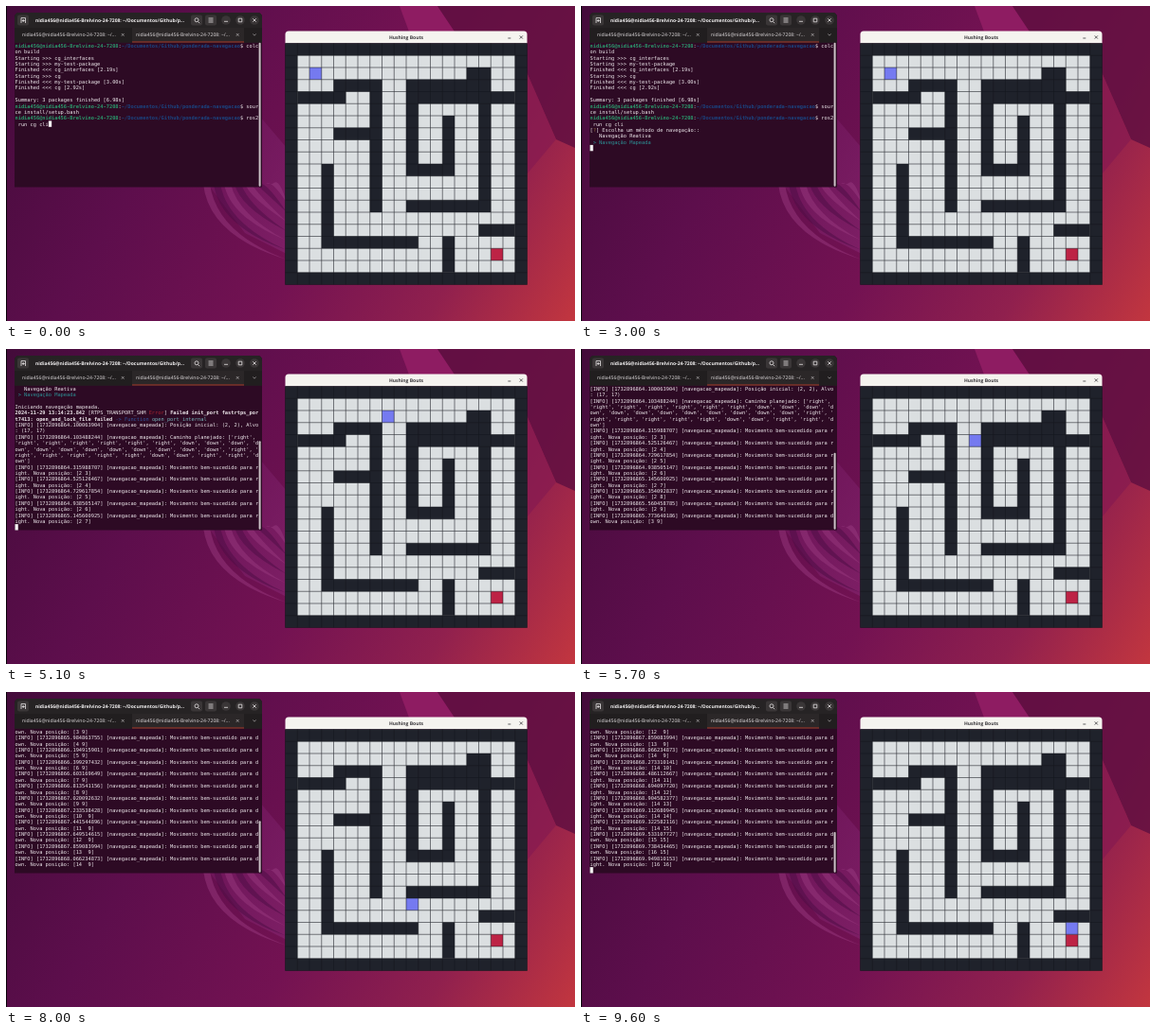
Write an HTML page that moves like this. It is 600 px wide and 333 px high and loops after 9700 ms.

```html
<!DOCTYPE html>
<html lang="pt">
<head>
<meta charset="utf-8">
<title>Navegação</title>
<style>
  html, body { margin: 0; width: 100%; height: 100%; overflow: hidden; background: #4d0d42; }
  svg { display: block; width: 600px; height: 333px; }
  text { white-space: pre; text-rendering: geometricPrecision; }
  .ui { font: 5px "Open Sans", "Noto Sans", sans-serif; fill: #e6e2e4; }
  .tab { font-size: 5.1px; }
  .bold { font-weight: 700; fill: #f4f2f3; }
  .icon { fill: none; stroke: #e6e3e4; stroke-width: .8; }
  #rows { font: 5.34px "DejaVu Sans Mono", monospace; fill: #eee8ec; }
  .user { fill: #2a9a6c; font-weight: 700; }
  .path { fill: #1b4480; font-weight: 700; }
  .strong { font-weight: 700; }
  .err { fill: #a8232f; }
  .ask { fill: #8d6c3c; }
  .pick { fill: #2c9195; }
  .fn { fill: #31559a; }
  .call { fill: #74b4b8; }
</style>
</head>
<body>
<svg viewBox="0 0 600 333">
  <defs>
    <linearGradient id="sky" gradientUnits="userSpaceOnUse" x1="0" y1="0" x2="600" y2="333">
      <stop offset="0" stop-color="#430b3a"/>
      <stop offset=".3" stop-color="#5d0e4c"/>
      <stop offset=".58" stop-color="#731252"/>
      <stop offset=".8" stop-color="#90204e"/>
      <stop offset="1" stop-color="#c2363f"/>
    </linearGradient>
    <linearGradient id="glow" x1="0" y1="0" x2="1" y2="1">
      <stop offset="0" stop-color="#6d1459"/>
      <stop offset="1" stop-color="#82246d"/>
    </linearGradient>
  </defs>

  <g id="wallpaper">
    <path d="M0 0H600V333H0Z" fill="url(#sky)"/>
    <path d="M415 0H455L473 27H425Z" fill="#8e1c62"/>
    <path d="M455 0H600V150L580 141L549 70V27H473Z" fill="#5e0e40" opacity=".8"/>
    <path d="M549 70L580 141L549 178Z" fill="#861a50" opacity=".7"/>
    <path d="M262 110L296 150V262L252 240L215 191Z" fill="url(#glow)" opacity=".7"/>
    <g id="ribbons"/>
    <path d="M0 0H1V333H0Z" fill="#0a0209"/>
  </g>

  <g id="terminal">
    <path d="M9 191.5V12Q9 7 14 7H265Q270 7 270 12V191.5Z" fill="#2d0a24"/>
    <path d="M9 38.5V12Q9 7 14 7H265Q270 7 270 12V38.5Z" fill="#262324"/>
    <path d="M9 23H270V38.5H9Z" fill="#211e1f"/>
    <path d="M133 23H251V38.5H133Z" fill="#2b2728"/>
    <path d="M133 37.5H251V38.4H133Z" fill="#a8372b"/>
    <g fill="#3a3637">
      <rect x="12" y="9.5" width="12" height="11" rx="2"/>
      <rect x="195" y="9.5" width="12" height="11" rx="2"/>
      <rect x="210" y="9.5" width="12" height="11" rx="2"/>
      <circle cx="232" cy="15" r="4.8"/><circle cx="247" cy="15" r="4.8"/><circle cx="262" cy="15" r="4.8"/>
    </g>
    <path class="icon" d="M16 18V12.6H20.5V18M18.2 14V17M16.7 15.5H19.8M202.6 16.6L204.2 18.2M213.5 13H218.5M213.5 15H218.5M213.5 17H218.5M230 16.3H234M245.2 13.2H248.8V16.8H245.2ZM260.3 13.3L263.7 16.7M263.7 13.3L260.3 16.7"/>
    <circle class="icon" cx="201" cy="14.8" r="2"/>
    <path class="icon" opacity=".65" d="M121.8 29L124.6 31.8M124.6 29L121.8 31.8M242.8 29L245.6 31.8M245.6 29L242.8 31.8M260.3 29.6L262 31.2L263.7 29.6"/>
    <text class="ui bold" id="title" x="31" y="16.8"/>
    <text class="ui tab" x="17" y="32.2"/>
    <text class="ui tab" x="137" y="32.2"/>
    <g id="rows"/>
    <rect id="cursor" width="3.3" height="6.4" fill="#f6f2f4"/>
    <rect id="thumb" x="266.6" width="2" rx="1" fill="#cbc3c7"/>
  </g>

  <g id="game">
    <path d="M294.5 39.5V30Q294.5 26.5 298 26.5H546Q549.5 26.5 549.5 30V39.5Z" fill="#f5f3ef"/>
    <text class="ui" x="422" y="34.8" text-anchor="middle" style="font-weight:700;fill:#38363a">Hushing Bouts</text>
    <path d="M529.3 34H532.3M541.7 31.4L544.9 34.6M544.9 31.4L541.7 34.6" stroke="#3c3a3d" stroke-width=".8"/>
    <g transform="translate(294.5 39.5) scale(12.75)">
      <rect width="20" height="20" fill="#1f222b"/>
      <rect x="1" y="1" width="18" height="18" fill="#dbdfe1"/>
      <path id="walls" fill="#1f222b"/>
      <rect x="17" y="17" width="1" height="1" fill="#bd2345"/>
      <rect id="robot" width="1" height="1" fill="#757af0"/>
      <path id="mesh" stroke="#14161d" stroke-width=".05" opacity=".85"/>
    </g>
  </g>
</svg>

<script>
const LOOP = 9700, FRAME = 100;
const COLS = 80, ROWS = 24, CHAR = 3.215, PITCH = 6.37, LEFT = 9.5, TOP = 38.6;
const $ = id => document.getElementById(id);
const range = n => [...Array(n).keys()];

function add(parent, tag, attrs = {}, text = '') {
  const el = document.createElementNS('http://www.w3.org/2000/svg', tag);
  for (const k in attrs) el.setAttribute(k, attrs[k]);
  el.textContent = text;
  return parent.appendChild(el);
}

// Wallpaper ribbons: tapered blades sweeping down to the right
for (const i of range(7)) {
  const x = 208 + i * 11, y = 268 - i * 10;
  add($('ribbons'), 'path', {
    d: `M${x} 188Q${x + 6} ${y - 25} 296 ${y}Q${x + 14} ${y - 28} ${x + 7} 188Z`,
    fill: i % 2 ? '#4c0c45' : '#98397f', opacity: .5
  });
}

// Maze: column, row, width, height
const walls = [
  [15, 2, 2, 1], [4, 3, 4, 1], [10, 3, 7, 1], [1, 4, 4, 1], [10, 4, 9, 1],
  [7, 4, 1, 10], [4, 7, 3, 1], [10, 5, 1, 6], [11, 10, 3, 1], [13, 6, 1, 4],
  [16, 5, 1, 9], [10, 13, 6, 1], [3, 10, 1, 7], [4, 16, 7, 1], [16, 15, 3, 1], [13, 16, 1, 3]
];
$('walls').setAttribute('d', walls.map(([x, y, w, h]) => `M${x} ${y}h${w}v${h}h${-w}z`).join(''));
$('mesh').setAttribute('d', range(21).map(i => `M${i} 0V20M0 ${i}H20`).join(''));

// Route as [row, column] pairs
const moves = [['right', 7], ['down', 12], ['right', 6], ['down', 2], ['right', 2], ['down', 1]]
  .flatMap(([dir, n]) => Array(n).fill(dir));
const route = [[2, 2]];
for (const dir of moves) {
  const [r, c] = route[route.length - 1];
  route.push(dir === 'down' ? [r + 1, c] : [r, c + 1]);
}
const stepTime = k => k < 13 ? 3866 + 212 * k : 6622 + 197.5 * (k - 13);

// Terminal log, wrapped to the terminal width
const host = 'nidia456@nidia456-Brelvino-24-7208';
$('title').textContent = host + ': ~/Documentos/Github/p...';
document.querySelectorAll('.tab').forEach(el => el.textContent = host + ': ~/...');

const log = [];
function print(time, ...segs) {
  let row = [], used = 0;
  const flush = () => { log.push({ time, segs: row }); row = []; used = 0; };
  for (let [text, cls = ''] of segs.map(s => [].concat(s))) {
    while (text) {
      if (used === COLS) flush();
      const part = text.slice(0, COLS - used);
      row.push([part, cls]);
      used += part.length;
      text = text.slice(part.length);
    }
  }
  flush();
}
const prompt = cmd => print(0, [host, 'user'], ':', ['~/Documentos/Github/ponderada-navegacao', 'path'], '$ ' + cmd);
const info = (time, stamp, msg) => print(time, `[INFO] [173289686${stamp}] [navegacao_mapeada]: ${msg}`);

prompt('colcon build');
['Starting >>> cg_interfaces', 'Starting >>> my-test-package', 'Finished <<< cg_interfaces [2.19s]',
  'Starting >>> cg', 'Finished <<< my-test-package [3.00s]', 'Finished <<< cg [2.92s]', '',
  'Summary: 3 packages finished [6.98s]'].forEach(s => print(0, s));
prompt('source install/setup.bash');
prompt('ros2 run cg cli');

const ENTER = 300, MENU = 1300, DOWN = 2400, START = 3200;
print(MENU, '[', ['?', 'ask'], '] Escolha um método de navegação::');
const menuRow = log.length;
print(MENU, '   Navegação Reativa');
print(MENU, '   Navegação Mapeada');
print(START, '');
print(START, 'Iniciando navegação mapeada.');
print(3600, ['2024-11-29 13:14:23.842 ', 'strong'], '[RTPS_TRANSPORT_SHM ', ['Error', 'err'], '] ',
  ['Failed init_port fastrtps_port7413: open_and_lock_file failed', 'strong'], ' ',
  ['-> Function ', 'fn'], ['open_port_internal', 'call']);
info(stepTime(0), '4.100063904', 'Posição inicial: (2, 2), Alvo: (17, 17)');
info(stepTime(0), '4.103488244', `Caminho planejado: [${moves.map(m => `'${m}'`).join(', ')}]`);

const stamps = `4.315988707 4.525126467 4.729617854 4.938505147 5.145600925 5.354092837 5.560458785
  5.773640186 5.984863755 6.194915901 6.399297432 6.603169649 6.813541156 7.020092632
  7.233538428 7.441544896 7.649514615 7.859083994 8.066234873 8.273310141 8.486112667
  8.694097720 8.904582377 9.112680945 9.322582116 9.533107727 9.738434465 9.949810153`.split(/\s+/);
stamps.forEach((stamp, i) => {
  const [r, c] = route[i + 1];
  const col = String(c).padStart(String(r).length);
  info(stepTime(i + 1), stamp, `Movimento bem-sucedido para ${moves[i]}. Nova posição: [${r} ${col}]`);
});

const rows = range(ROWS).map(i => add($('rows'), 'text', { x: LEFT, y: TOP + 5.2 + PITCH * i }));

function segsAt(index, t) {
  const picked = menuRow + (t >= DOWN ? 1 : 0);
  if (index !== picked) return log[index].segs;
  return [[' > ' + log[index].segs[0][0].trim(), 'pick']];
}

function drawTerminal(t) {
  const shown = log.filter(l => l.time <= t).length;
  const total = Math.max(ROWS, shown + 1), first = total - ROWS;
  rows.forEach((el, i) => {
    el.textContent = '';
    if (first + i >= shown) return;
    for (const [text, cls] of segsAt(first + i, t)) add(el, 'tspan', { class: cls }, text);
  });

  const typing = t < ENTER;
  const cursor = $('cursor');
  cursor.setAttribute('x', LEFT + (typing ? 11 * CHAR : 0));
  cursor.setAttribute('y', TOP + PITCH * (shown - first - (typing ? 1 : 0)));
  cursor.setAttribute('opacity', t % 1200 <= 600 ? 1 : 0);

  const height = 152 * ROWS / total;
  $('thumb').setAttribute('y', 190.8 - height);
  $('thumb').setAttribute('height', height);
}

function drawRobot(t) {
  let n = 0;
  while (n < 29 && stepTime(n) <= t) n++;
  $('robot').setAttribute('x', route[n][1]);
  $('robot').setAttribute('y', route[n][0]);
}

let last = -1;
function tick() {
  const t = Math.floor(performance.now() % LOOP / FRAME) * FRAME;
  if (t !== last) {
    drawTerminal(t);
    drawRobot(t);
    last = t;
  }
  requestAnimationFrame(tick);
}
tick();
</script>
</body>
</html>
```
